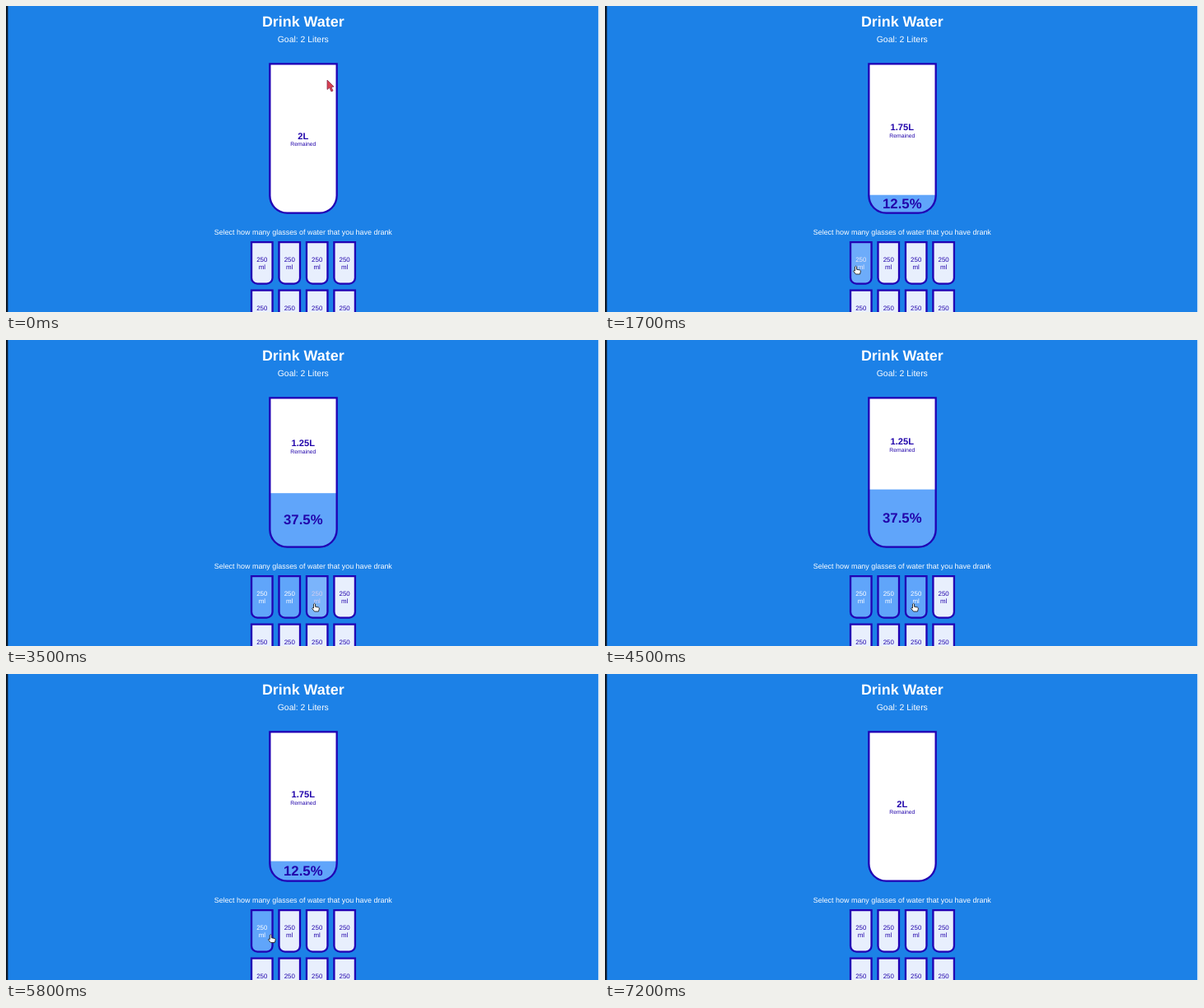
Animation, 720 px wide and 372 px high, one loop 7700 ms. Source, as an HTML page:

```html
<!DOCTYPE html>
<html lang="en">
<head>
<meta charset="utf-8">
<title>Drink Water</title>
<style>
  html, body { margin: 0; width: 100%; height: 100%; overflow: hidden; background: #1c81e7; }
  svg { display: block; width: 100%; height: 100%; }
  text { font-family: "Liberation Sans", Arial, sans-serif; text-anchor: middle; text-rendering: geometricPrecision; fill: #fff; }
  .bold { font-weight: bold; }
  .ink { fill: #2104ab; }
  .outline { fill: none; stroke: #2000b4; stroke-width: 2.3; }
</style>
</head>
<body>
<svg viewBox="0 0 720 372">
  <rect width="720" height="372" fill="#1c81e7"/>
  <rect width="2" height="372" fill="#0c1726"/>
  <rect x="2" width="1" height="372" fill="#16599f"/>
  <rect x="719" width="1" height="372" fill="#c9dff7"/>

  <text class="bold" x="360.8" y="25" font-size="17.9">Drink Water</text>
  <text x="360.8" y="44.4" font-size="10.45">Goal: 2 Liters</text>

  <clipPath id="inside"><path class="cup"/></clipPath>
  <path class="cup" fill="#fff"/>
  <g clip-path="url(#inside)">
    <g id="remained">
      <text id="liters" class="bold ink" x="360.8" y="161.5" font-size="11.1"></text>
      <text class="ink" x="360.8" y="170.2" font-size="6.8">Remained</text>
    </g>
    <g id="water">
      <rect id="fill" x="319" width="84" fill="#60a5fa"/>
      <text id="percent" class="bold ink" x="360.8" font-size="16.75"></text>
    </g>
  </g>
  <path class="cup outline"/>

  <text x="360.8" y="277.8" font-size="8.95">Select how many glasses of water that you have drank</text>
  <g id="glasses"></g>

  <g id="cursor">
    <path id="arrow" d="M0 0V11.5L2.7 9.3 5 14 7 13 4.9 8.6 8 8Z" fill="#d8404f" stroke="#8a2c50" stroke-width=".8"/>
    <path id="hand" d="M-1 1Q0 -.6 1 1V4.2L5 5Q6.2 5.4 5.8 7L5 10H0L-2.8 6.4Q-2.6 4.9 -1 6Z" fill="#fff" stroke="#222" stroke-width=".9"/>
  </g>
</svg>
<script>
const LOOP = 7700, STEP = 100, TRANSITION = 300;
const BOTTOM = 250.5, UNIT = 22.95;
const GLASS = { x: 296.9, y: 286, w: 27.8, h: 52.8, dx: 33.45, dy: 58.5 };
const EMPTY = [232, 239, 253], FULL = [96, 165, 250], INK = [33, 4, 171], WHITE = [255, 255, 255];

// [time, number of glasses drunk after the click]
const clicks = [[-1000, 0], [1510, 1], [2420, 2], [3350, 3], [4510, 2], [5245, 1], [6220, 0]];

// [time, x, y] of the pointer tip
const route = [
  [0, 390, 90], [900, 318, 300], [1300, 304.5, 316], [1800, 304.5, 316],
  [2300, 351, 319], [2700, 351, 319], [3200, 374.5, 320], [4600, 374.5, 320],
  [5100, 345, 318], [5400, 345, 318], [6000, 313, 316], [6500, 313, 316],
  [6900, 217, 50], [7100, 225, 15]
];

const $ = id => document.getElementById(id);
const clamp = v => Math.max(0, Math.min(1, v));
const mix = (a, b, k) => a + (b - a) * k;
const mixColor = (a, b, k) => `rgb(${a.map((v, i) => Math.round(mix(v, b[i], k)))})`;

// CSS "ease": cubic-bezier(.25, .1, .25, 1)
function ease(x) {
  const bezier = (a, b, s) => 3 * a * s * (1 - s) ** 2 + 3 * b * s * s * (1 - s) + s ** 3;
  let low = 0, high = 1;
  for (let i = 0; i < 20; i++) {
    const mid = (low + high) / 2;
    if (bezier(.25, .25, mid) < x) low = mid; else high = mid;
  }
  return bezier(.1, 1, low);
}

function cupPath(x, y, w, h, r) {
  const inset = 1.15;
  x += inset; y += inset; w -= 2 * inset; h -= 2 * inset; r -= inset;
  return `M${x} ${y}h${w}v${h - r}a${r} ${r} 0 0 1 ${-r} ${r}h${2 * r - w}a${r} ${r} 0 0 1 ${-r} ${-r}z`;
}

function add(parent, tag, attributes, content = "") {
  const node = document.createElementNS("http://www.w3.org/2000/svg", tag);
  for (const key in attributes) node.setAttribute(key, attributes[key]);
  node.textContent = content;
  return parent.appendChild(node);
}

function makeGlass(_, i) {
  const x = GLASS.x + (i % 4) * GLASS.dx, y = GLASS.y + Math.floor(i / 4) * GLASS.dy;
  const group = add($("glasses"), "g", {});
  const body = add(group, "path", { class: "outline", d: cupPath(x, y, GLASS.w, GLASS.h, 8.3) });
  const label = (text, dy) =>
    add(group, "text", { x: x + GLASS.w / 2, y: y + dy, "font-size": 7.9 }, text);
  return { x, y, body, labels: [label("250", 25.2), label("ml", 34.1)] };
}

document.querySelectorAll(".cup").forEach(p => p.setAttribute("d", cupPath(319.2, 69.3, 83.6, 183.5, 22.2)));
const glasses = Array.from({ length: 8 }, makeGlass);

function drawWater(t) {
  const index = clicks.findLastIndex(([time]) => time <= t);
  const [time, count] = clicks[index];
  const before = index ? clicks[index - 1][1] : 0;
  const level = mix(before, count, ease(clamp((t - time) / TRANSITION)));
  const height = level * UNIT;

  $("liters").textContent = 2 - count / 4 + "L";
  $("remained").setAttribute("transform", `translate(0 ${-height / 2})`);
  $("water").style.display = height > .05 ? "" : "none";
  $("fill").setAttribute("y", BOTTOM - height);
  $("fill").setAttribute("height", height + 2);
  $("percent").textContent = (count || 1) * 12.5 + "%";
  $("percent").setAttribute("y", BOTTOM - height / 2 + 6.1);

  glasses.forEach((glass, i) => {
    const k = clamp(level - i);
    glass.body.style.fill = mixColor(EMPTY, FULL, k);
    glass.labels.forEach(label => label.style.fill = mixColor(INK, WHITE, k));
  });
}

function drawCursor(t) {
  const visible = t <= route.at(-1)[0];
  $("cursor").style.display = visible ? "" : "none";
  if (!visible) return;
  const next = Math.max(1, route.findIndex(([time]) => time >= t));
  const [t0, x0, y0] = route[next - 1], [t1, x1, y1] = route[next];
  const k = clamp((t - t0) / (t1 - t0)), smooth = k * k * (3 - 2 * k);
  const x = mix(x0, x1, smooth), y = mix(y0, y1, smooth);
  const over = glasses.some(g => x > g.x && x < g.x + GLASS.w && y > g.y && y < g.y + GLASS.h);
  $("cursor").setAttribute("transform", `translate(${x} ${y})`);
  $("hand").style.display = over ? "" : "none";
  $("arrow").style.display = over ? "none" : "";
}

const start = performance.now();
function frame() {
  const elapsed = (performance.now() - start) % LOOP;
  const t = Math.floor(elapsed / STEP) * STEP;
  drawWater(t);
  drawCursor(t);
  requestAnimationFrame(frame);
}
frame();
</script>
</body>
</html>
```
